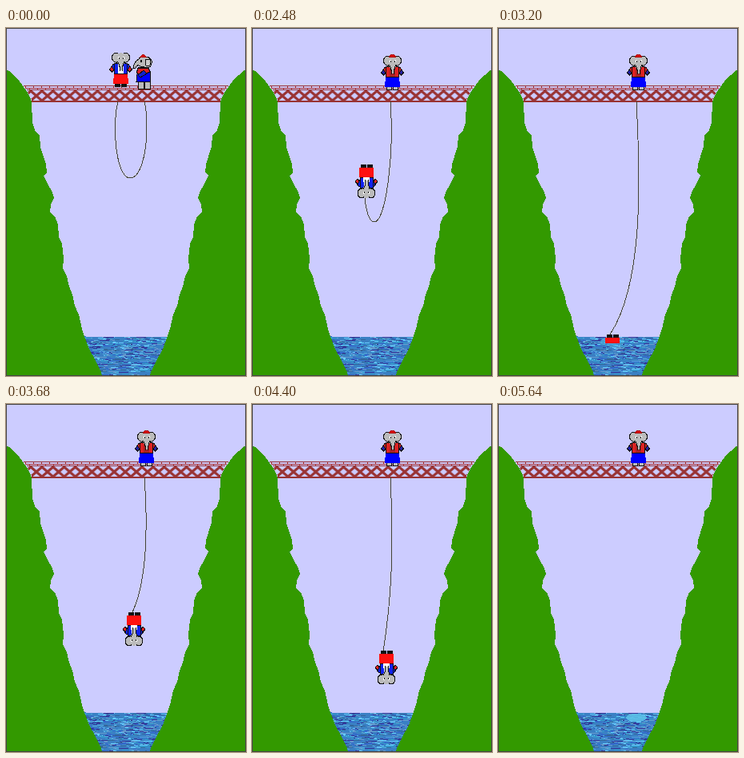
Write an HTML page that moves like this. It is 300 px wide and 436 px high and loops after 8640 ms.

```html
<!DOCTYPE html>
<html lang="en">
<head>
<meta charset="utf-8">
<title>Bungee jump</title>
<style>
  html, body { margin: 0; width: 100%; height: 100%; overflow: hidden; background: #ccf; }
  svg { display: block; width: 100%; height: 100%; }
</style>
</head>
<body>
<svg viewBox="0 0 300 436" shape-rendering="crispEdges">
  <defs>
    <clipPath id="dry"><rect width="300" height="395"/></clipPath>
    <pattern id="rail" width="10" height="6" y="72" x="2" patternUnits="userSpaceOnUse">
      <path d="M0 .5H10M0 3.5H10M2.5 0V3M7.5 3V6" stroke="#a33" fill="none"/>
    </pattern>
    <pattern id="truss" width="13.9" height="14" x="31" y="78" patternUnits="userSpaceOnUse">
      <path d="M-1 0L14.9 14M14.9 0L-1 14" stroke="#933" stroke-width="3.2" fill="none" shape-rendering="auto"/>
    </pattern>
  </defs>
  <rect width="300" height="436" fill="#ccf"/>
  <g id="water"></g>
  <ellipse id="splash" cy="393" fill="#5bc0e8"/>
  <g id="cliffs" fill="#390"></g>
  <g id="bridge">
    <path d="M22 72H278L267 92H33Z" fill="#ccf"/>
    <path d="M22 72H278L274 78H26Z" fill="url(#rail)"/>
    <path d="M26 78H274L267 92H33Z" fill="url(#truss)"/>
    <path d="M22 72.5H278M26 77.5H274M32 92H268" stroke="#933" stroke-width="1.4"/>
  </g>
  <path id="rope" fill="none" stroke="#443" stroke-width="1"/>
  <g id="side"></g>
  <g id="front"></g>
  <g clip-path="url(#dry)"><g id="jumper"></g></g>
  <rect x=".5" y=".5" width="299" height="435" fill="none" stroke="#444"/>
</svg>
<script>
const LOOP = 8640;
const $ = id => document.getElementById(id);
const show = (el, on) => el.setAttribute('display', on ? 'inline' : 'none');
const both = s => s + `<g transform="scale(-1 1)">${s}</g>`;

// Gorge walls: one outline, mirrored
const wall = '0,52 4,54 9,59 15,64 22,74 28,82 32,92 33,119 37,130 42,134 43,149 47,161 50,171 51,181 47,185 ' +
  '52,195 58,206 60,213 56,221 55,231 61,236 65,246 66,262 70,270 72,289 71,301 76,311 79,324 83,334 ' +
  '86,348 91,359 95,377 99,389 104,402 112,417 119,431 120,436 0,436';
$('cliffs').innerHTML = `<polygon points="${wall}"/><polygon points="${wall}" transform="matrix(-1 0 0 1 300 0)"/>`;

// Water streaks
let seed = 11;
const rnd = () => (seed = (seed * 16807) % 2147483647) / 2147483647;
const blues = ['#369', '#39c', '#6cf', '#36c', '#69c', '#339', '#5ad'];
let streaks = '<rect x="94" y="387" width="112" height="49" fill="#3a80c4"/>';
for (let i = 0; i < 520; i++) {
  const x = 92 + rnd() * 112, y = 387 + Math.floor(rnd() * 48) + .5;
  const len = 3 + rnd() * 9, slope = Math.round(rnd() * 2 - .6);
  streaks += `<path d="M${x.toFixed(1)} ${y}l${len.toFixed(1)} ${slope}" stroke="${blues[Math.floor(rnd() * 7)]}"/>`;
}
$('water').innerHTML = streaks;

// Front view, 45 high, centred on x = 0
function elephant(coat, cuff, pants, hat) {
  const shoes = hat ? '#bbb' : '#111';
  return `<g stroke="#111" stroke-width="1">` +
    both(`<rect x="1" y="40" width="6" height="4" fill="${shoes}"/>
      <path d="M5 15L10 17L14 23L11 26L6 22Z" fill="${coat}"/>
      <path d="M11 19L14 23L11 26L9 23Z" fill="${cuff}"/>`) +
    `<path d="M-8 28H8L9 40H-9Z" fill="${pants}" stroke="${pants}"/>
    <path d="M-8 15H8V28H-8Z" fill="${coat}"/>
    <path d="M-3 16H3L4 28H-4Z" fill="${hat ? '#a22' : '#fff'}" stroke="none"/>` +
    both(`<ellipse cx="6" cy="8" rx="5" ry="6" fill="#bbb"/>`) +
    `<path d="M-5 5Q0 -1 5 5V13Q3 17 2 24H-1Q-2 17 -5 13Z" fill="#bbb" stroke="none"/>
    <path d="M-4 13Q-1 17 -1 25M4 13Q2 18 2 25" fill="none"/>` +
    both(`<rect x="2" y="7" width="2" height="3" fill="#fff" stroke="none"/><path d="M2.5 8v2"/>`) +
    (hat ? '<path d="M-4 3Q0 -3 4 3Z" fill="#d11" stroke="#a11"/>' : '') + '</g>';
}
$('jumper').innerHTML = elephant('#12e', '#e22', '#f11', false);
$('front').innerHTML = elephant('#d22', '#22a', '#00f', true);
$('front').setAttribute('transform', 'translate(175.5 33)');

$('side').innerHTML = `<g stroke="#111">
  <path d="M165 67h7v9h-7zM173 67h7v9h-7z" fill="#bbb"/>
  <path d="M165 50L178 49L181 57L180 67H163Z" fill="#00f"/>
  <path d="M165 51L178 50L180 55L170 59L163 56Z" fill="#d22"/>
  <path d="M172 53L165 59L168 62L176 57Z" fill="#12c"/>
  <path d="M166 39Q162 41 160 46L159 50L162 50Q164 45 168 48L178 50Q183 47 182 41Q179 35 172 36Q167 36 166 39Z" fill="#bbb"/>
  <path d="M174 40Q181 37 181 43Q180 49 175 47Z" fill="#ccc"/>
  <path d="M168 36Q171 31 175 36Z" fill="#d11" stroke="#a11"/>
  <path d="M169 40v3" stroke-width="2"/></g>`;

// Each pose holds until the next: start, centre x, head y, rope
const poses = [
  [0, 143.5, 29, 'M140 92C137 104 136 124 137 141C139 172 147 188 155 188C168 188 176 158 176 125C176 111 175 100 173 92'],
  [2000, 143, 127, 'M134 125C133 165 142 196 151 196C167 196 181 135 173 92'],
  [2240, 143, 165, 'M137 163C137 190 143 215 152 215C167 215 180 145 173 92'],
  [2480, 143, 215, 'M141 213C143 231 147 243 153 243C167 243 178 160 173 92'],
  [2720, 143, 278, 'M145 277C147 288 150 297 154 297C168 297 176 180 173 92'],
  [2960, 143, 362, 'M173 92C177 185 180 310 145 319'],
  [3200, 143, 428, 'M173 92C178 190 182 320 140 384'],
  [3440, 151, 375, 'M173 92C178 180 177 270 149 331'],
  [3680, 160, 305, 'M173 92C177 150 177 220 158 261'],
  [3920, 168, 353, 'M173 92C177 180 175 240 164 310'],
  [4160, 168, 332, 'M173 92C178 170 177 225 165 289'],
  [4400, 168, 353, 'M173 92C177 180 175 240 164 310'],
  [5400, 0, 0, 'M173 153V387'],
  [5640, 0, 0, '']
];

function draw(t) {
  const [start, x, y, rope] = poses.findLast(p => p[0] <= t);
  const upright = start === 0, gone = start >= 5400;
  show($('side'), upright);
  show($('front'), !upright);
  show($('jumper'), !gone);
  $('jumper').setAttribute('transform', `translate(${x} ${y}) scale(1 ${upright ? 1 : -1})`);
  $('rope').setAttribute('d', rope);

  const dip = start === 3200 || start === 3440;
  const splash = $('splash');
  show(splash, dip || gone);
  splash.setAttribute('cx', gone ? 173 : 143);
  splash.setAttribute('rx', gone ? 13 : 15);
  splash.setAttribute('ry', gone ? 5 : 6);
  splash.setAttribute('opacity', gone ? .9 : .4);
}

function tick() {
  draw(performance.now() % LOOP);
  requestAnimationFrame(tick);
}
tick();
</script>
</body>
</html>
```
